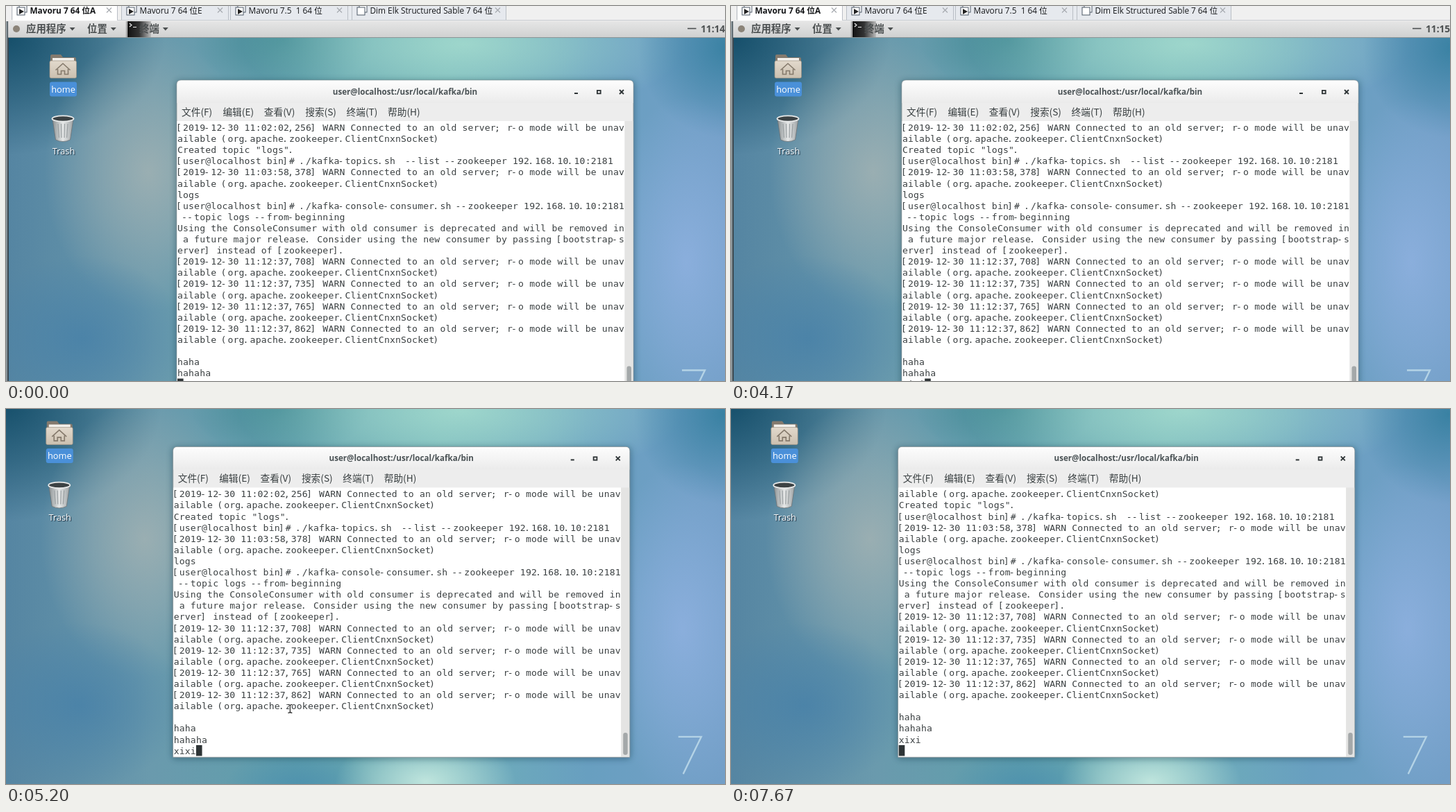
Write an HTML page that moves like this. It is 1036 px wide and 541 px high and loops after 8 s.

```html
<!DOCTYPE html>
<html lang="zh">
<head>
<meta charset="utf-8">
<title>Terminal session</title>
<style>
html, body { margin: 0; width: 100%; height: 100%; overflow: hidden; background: #5f95b0; }
svg { display: block; width: 100vw; height: 100vh; }
text { white-space: pre; }
.ui { font-family: 'Open Sans', 'Noto Sans CJK SC', 'Noto Sans CJK', sans-serif; }
.menu { font: 13.7px 'Noto Sans CJK SC', 'Noto Sans CJK', sans-serif; fill: #3a4042; }
.mono { font: 13.1px 'DejaVu Sans Mono', monospace; fill: #3b4042; }
.bold { font-weight: bold; }
.mid { text-anchor: middle; }
</style>
</head>
<body>
<svg id="stage" viewBox="0 0 1036 541" preserveAspectRatio="none"></svg>
<script>
const LOOP = 8000, COL = 8.05, ROW = 16.1, LEFT = 247, BASE = 180;
const INK = '#2e3436', GREY = '#4b4f50';

const warn = time => [
  `[2019-12-30 11:${time}] WARN Connected to an old server; r-o mode will be unav`,
  'ailable (org.apache.zookeeper.ClientCnxnSocket)'
];
const prompt = '[user@localhost bin]# ';
const lines = [
  ...warn('02:02,256'),
  'Created topic "logs".',
  prompt + './kafka-topics.sh  --list --zookeeper 192.168.10.10:2181',
  ...warn('03:58,378'),
  'logs',
  prompt + './kafka-console-consumer.sh --zookeeper 192.168.10.10:2181',
  ' --topic logs --from-beginning',
  'Using the ConsoleConsumer with old consumer is deprecated and will be removed in',
  ' a future major release. Consider using the new consumer by passing [bootstrap-s',
  'erver] instead of [zookeeper].',
  ...['708', '735', '765', '862'].flatMap(ms => warn('12:37,' + ms)),
  '', 'haha', 'hahaha'
];

// Narrow punctuation sits at the left of its cell.
const cellX = (ch, i) => (LEFT + i * COL - ('[]().,;-'.includes(ch) ? 2 : 0)).toFixed(1);
const row = (s, i) =>
  `<text class="mono" y="${(BASE + i * ROW).toFixed(1)}" x="${[...s].map(cellX).join(' ')}">${s}</text>`;
const rect = (x, y, w, h, fill, more = '') =>
  `<rect x="${x}" y="${y}" width="${w}" height="${h}" fill="${fill}" ${more}/>`;
const line = (d, stroke, w = 1) => `<path d="${d}" stroke="${stroke}" stroke-width="${w}" fill="none"/>`;
const shape = (d, fill, more = '') => `<path d="${d}" fill="${fill}" ${more}/>`;
const label = (x, y, s, size, fill, cls = '', more = '') =>
  `<text x="${x}" y="${y}" font-size="${size}" fill="${fill}" class="ui ${cls}" ${more}>${s}</text>`;
const linear = (id, dir, ...stops) =>
  `<linearGradient id="${id}" x2="${dir === 'x' ? 1 : 0}" y2="${dir === 'y' ? 1 : 0}">` +
  stops.map((c, i) => `<stop offset="${i / (stops.length - 1)}" stop-color="${c}"/>`).join('') + '</linearGradient>';

function glow(x, y, rx, ry, color) {
  const id = 'g' + color.slice(1);
  const stop = (at, alpha) => `<stop offset="${at}" stop-color="${color}" stop-opacity="${alpha}"/>`;
  return `<radialGradient id="${id}">${stop(0, .85)}${stop(.5, .45)}${stop(1, 0)}</radialGradient>` +
    `<ellipse cx="${x}" cy="${y}" rx="${rx}" ry="${ry}" fill="url(#${id})"/>`;
}

function wallpaper() {
  return '<g clip-path="url(#desk)">' + rect(3, 45, 1050, 560, 'url(#wall)') +
    glow(0, 45, 230, 170, '#0a4560') +
    glow(205, 240, 150, 200, '#a2b2b3') +
    glow(110, 480, 150, 120, '#4881a8') +
    glow(400, 50, 130, 70, '#3f8792') +
    glow(660, 55, 320, 110, '#a6ddcf') +
    glow(1040, 60, 130, 130, '#2f7c9c') +
    glow(980, 370, 120, 240, '#8fb1e0') +
    glow(430, 600, 110, 60, '#4b8fae') +
    glow(610, 590, 130, 70, '#cdeee4') +
    '</g>' + line('M974 525.5H1007L981 579', '#b4d3e6', 2.4);
}

function tab(icon, width, name, running, active) {
  return (active ? rect(icon - 6, -5, width, 26, '#fff') : '') +
    rect(icon + 3, -2, 11, 11, '#fff', 'stroke="#4d5966"') +
    rect(icon, 2, 11, 11, '#fff', 'stroke="#4d5966"') +
    (running ? shape(`M${icon + 3} 4l7 4-7 4z`, '#222') : '') +
    label(icon + 18.5, 10.5, name, 11.8, '#16181a', active ? 'bold' : '') +
    line(`M${icon + width - 21} 2.5l7 7m0-7l-7 7`, '#a7abb0', 1.2) +
    line(`M${icon - 7.5} 0V20M${icon + width - 5.5} 0V20`, '#b9bec5');
}

function tabs() {
  return rect(0, -5, 1050, 27, '#f0f0f0') + rect(166, -5, 554, 25, '#e6e9ee') +
    line('M160 20.5H1050', '#c9cdd2') +
    tab(16, 150, 'Mavoru 7 64 位A', true, true) +
    tab(174, 152, 'Mavoru 7 64 位E', true) +
    tab(331, 167, 'Mavoru 7.5  1 64 位', true) +
    tab(506, 220, 'Dim Elk Structured Sable 7 64 位', false);
}

function panel() {
  const item = (x, s) => label(x, 38, s, 14.4, GREY, 'bold') +
    shape(`M${x + s.length * 14.4 + 5} 31h8l-4 4.5z`, GREY);
  return rect(3, 21.5, 1050, 24.5, 'url(#bar)') + line('M3 45.5H1050', '#8b9496') +
    '<circle cx="15" cy="33" r="5" fill="#8b8378"/>' +
    item(29, '应用程序') + item(117, '位置') +
    rect(175, 22, 34, 23, 'url(#term)') + line('M173.5 22V45', '#888') +
    line('M178 25l3 2.5-3 2.5M183 30.5h5', '#eee', 1.2) +
    item(192, '终端') + line('M982 32.5H994.5', GREY, 1.6) +
    label(1001, 38, '11:14', 13.7, GREY, 'bold', 'id="clock"');
}

function icons() {
  return shape('M64 72q0-2 2-2h13l3 4h17q2 0 2 2v20H64z', '#847a6e') +
    rect(67, 75, 31, 8, '#f4f1ec') +
    rect(63, 79, 38.5, 25, 'url(#folder)', 'rx="2" stroke="#9b9082" stroke-width=".7"') +
    line('M71.5 92.5L82 83l10.5 9.5M74.5 91v7.5h5v-5h5v5h5V91', '#857a6c', 1.6) +
    rect(63, 109.5, 39, 21, '#4a90d9', 'rx="3"') +
    label(82.5, 124.5, 'home', 12.8, '#fff', 'mid') +
    shape('M67 163l4.5 30q10.500 5 21 0l4.500-30z', 'url(#bin)', 'stroke="#6e7375" stroke-width=".8"') +
    [-7, -2.5, 2.5, 7].map(d => line(`M${82 + d} 170L${82 + d * .8} 190`, '#9aa0a2', 1.2)).join('') +
    '<ellipse cx="82" cy="162.500" rx="15.500" ry="4.200" fill="#3c4244" stroke="#e8eaea" stroke-width="1.8"/>' +
    label(83, 214, 'Trash', 12.8, '#fff', 'mid', 'style="text-shadow:1px 1px 1px #123"');
}

function terminal() {
  const menu = ['文件(F)', '编辑(E)', '查看(V)', '搜索(S)', '终端(T)', '帮助(H)'];
  return rect(244, 107, 662, 451, '#0b2c3c', 'rx="6" opacity=".35" filter="url(#soft)"') +
    shape('M246 555V113q0-6 6-6H898q6 0 6 6V555z', '#ededed', 'stroke="#8a9599" stroke-width=".8"') +
    shape('M246.5 140V113q0-5.500 6-5.500H898q5.500 0 5.500 5.500V140z', 'url(#head)') +
    label(575, 128, 'user@localhost:/usr/local/kafka/bin', 11.6, '#4a5255', 'bold mid') +
    rect(819, 125, 5, 2, INK) +
    rect(851.9, 121.9, 4.8, 4.4, 'none', `stroke="${INK}" stroke-width="1.8"`) +
    line('M884 121l6 6m0-6l-6 6', INK, 1.9) +
    menu.map((s, i) => `<text class="menu" x="${253 + i * 59.4}" y="158">${s}</text>`).join('') +
    rect(246.5, 166, 645, 388, '#fff') + rect(891.5, 166, 12, 388, '#e4e4e3') +
    rect(894.5, 519.5, 6.5, 32, '#a4a8a9', 'rx="3.2"') +
    '<g clip-path="url(#screen)"><g id="scroll">' + lines.map(row).join('') +
    '<g id="typed"></g></g>' + rect(LEFT, 537.5, 8.6, 15.6, INK, 'id="block"') + '</g>';
}

const beam = 'M-3-6Q0-6 0-4Q0-6 3-6M0-5V5M-3 6Q0 6 0 4Q0 6 3 6';
const stage = document.getElementById('stage');
stage.innerHTML = '<defs>' +
  linear('wall', 'x', '#5585a2', '#6a9aad', '#5f9fac', '#70b1b8', '#689fc0', '#749fc8') +
  linear('bar', 'y', '#e6e6e6', '#cfd0d0') + linear('head', 'y', '#fdfdfd', '#ebebeb') +
  linear('term', 'x', '#111', '#333', '#bbb') + linear('folder', 'y', '#e2d9cc', '#cbc0b0') +
  linear('bin', 'x', '#8c9294', '#e6e8e8', '#9da2a4') +
  '<clipPath id="desk"><rect x="3" y="45" width="1050" height="560"/></clipPath>' +
  '<clipPath id="screen"><rect x="246" y="166" width="645" height="388"/></clipPath>' +
  '<filter id="soft"><feGaussianBlur stdDeviation="4"/></filter></defs>' +
  '<g id="world">' + wallpaper() + rect(0, 20, 2, 590, '#8a9499') + rect(2, 20, 2, 590, '#3d4a52') +
  tabs() + panel() + icons() + terminal() + '</g>' +
  '<g id="mouse"><g id="beam">' + line(beam, '#fff', 3) + line(beam, '#222', 1.2) + '</g>' +
  shape('M0 0V14L3.3 11L5.500 16L7.500 15L5.300 10.500H9.500Z', '#111', 'stroke="#fff" id="arrow"') + '</g>';

const WORD = 'xixi', KEYS = [2450, 2530, 2770, 2860], ENTER = 6500;
const BLINK = 585, STEP = 80, MINUTE = 2380;

const easeIn = p => p * p;
const easeOut = p => 1 - (1 - p) ** 2;
const gestures = [
  { start: 130, end: 590, hide: KEYS[0], from: [487, 546], to: [478, 518], ease: easeIn },
  { start: 3770, end: 4170, hide: 4170, from: [478, 518], to: [545, 20], ease: easeIn },
  { start: 4870, end: 5260, hide: 5410, from: [570, 26], to: [404, 446], ease: easeOut },
  { start: 5410, end: 6050, hide: ENTER, from: [403, 445], to: [394, 467], ease: easeIn },
  { start: 6970, end: 7440, hide: 7440, from: [394, 467], to: [389, 40], ease: easeIn }
];

function mouseAt(t) {
  const g = gestures.find(g => t >= g.start && t < g.hide);
  if (!g) return null;
  const held = Math.floor((t - g.start) / STEP) * STEP;
  const p = t >= g.end ? 1 : g.ease(held / (g.end - g.start));
  return g.from.map((v, i) => v + (g.to[i] - v) * p);
}

// The page jumps up in three quick steps.
const scrollAt = t => t < 4550 ? 0 : t < 4620 ? -21.5 : t < 4700 ? -49 : -52.6;

// The block cursor restarts its blink at every key press.
function blockOn(t) {
  const key = [...KEYS, ENTER].findLast(k => k <= t);
  return key === undefined || Math.floor((t - key) / BLINK) % 2 === 0;
}

const $ = id => document.getElementById(id);
const show = (id, on) => $(id).setAttribute('visibility', on ? 'visible' : 'hidden');
const move = (id, x, y) => $(id).setAttribute('transform', `translate(${x} ${y})`);
let lastCount = 0;

function draw(t) {
  const vy = scrollAt(t), vx = vy * .1, sent = t >= ENTER;
  const count = KEYS.filter(k => k <= t).length;
  move('world', vx, vy);
  move('scroll', 0, sent ? -ROW : 0);
  if (count !== lastCount) $('typed').innerHTML = row(WORD.slice(0, count), lines.length);
  lastCount = count;
  $('block').setAttribute('x', LEFT + (sent ? 0 : count) * COL);
  show('block', blockOn(t));
  $('clock').textContent = t < MINUTE ? '11:14' : '11:15';

  const pos = mouseAt(t);
  const overText = pos && pos[0] - vx > 246 && pos[1] - vy > 166;
  if (pos) move('mouse', ...pos);
  show('beam', overText);
  show('arrow', pos && !overText);
}

const start = performance.now();
function tick() {
  draw((performance.now() - start) % LOOP);
  requestAnimationFrame(tick);
}
tick();
</script>
</body>
</html>
```
